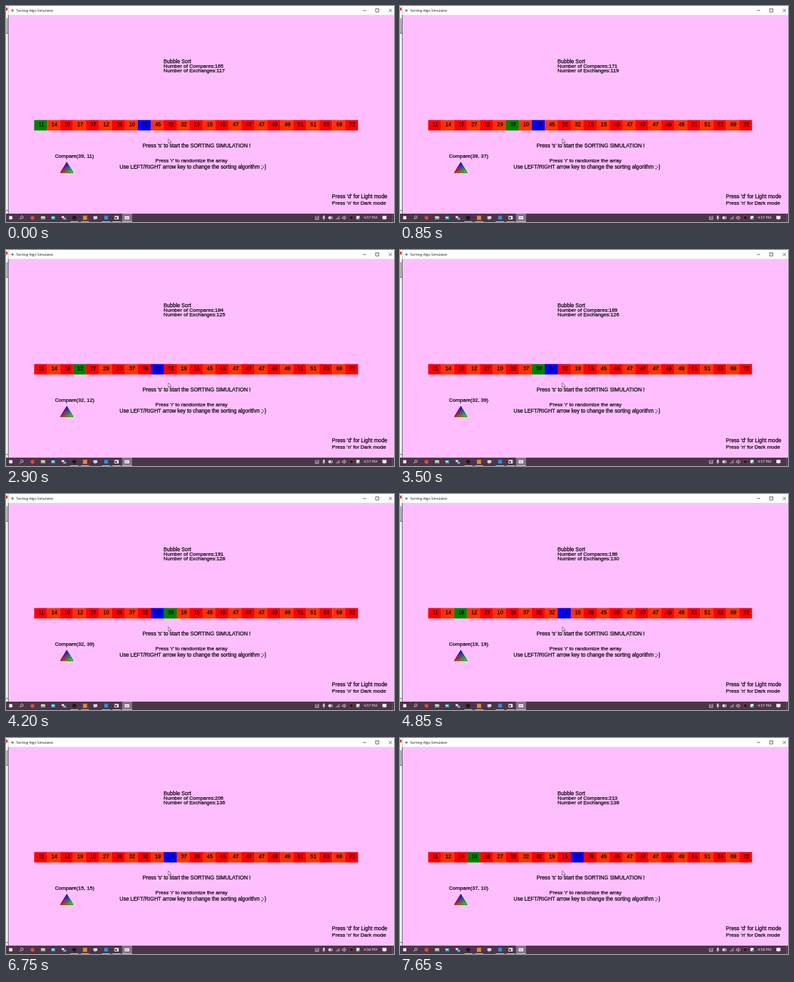
An HTML page for the animation above (7.7 s loop, 600 by 336 pixels).

```html
<!DOCTYPE html>
<html lang="en">
<head>
<meta charset="utf-8">
<title>Sorting Algo Simulator</title>
<style>
  html, body { margin: 0; width: 100%; height: 100%; overflow: hidden; background: #ffbfff; }
  svg { display: block; width: 600px; height: 336px; }
  text { font-family: "Liberation Sans", Arial, sans-serif; white-space: pre; }
  .app { font-size: 8.2px; fill: #080008; stroke: #080008; stroke-width: .25px; }
  .tight { font-size: 8.07px; }
  .ui { font-family: "Open Sans", "Noto Sans", sans-serif; font-size: 5.6px; }
  .mix { isolation: isolate; }
  .mix polygon { mix-blend-mode: screen; }
  .line { fill: none; stroke: #e9e4e9; stroke-width: .8; }
</style>
</head>
<body>
<svg viewBox="0 0 600 336">
  <defs>
    <linearGradient id="top" gradientUnits="userSpaceOnUse" x1="94" y1="243" x2="94" y2="259.3">
      <stop stop-color="#00f"/><stop offset="1" stop-color="#000"/>
    </linearGradient>
    <linearGradient id="left" gradientUnits="userSpaceOnUse" x1="83.9" y1="259.3" x2="99" y2="250">
      <stop stop-color="#f00"/><stop offset="1" stop-color="#000"/>
    </linearGradient>
    <linearGradient id="right" gradientUnits="userSpaceOnUse" x1="104.1" y1="259.3" x2="89" y2="250">
      <stop stop-color="#0f0"/><stop offset="1" stop-color="#000"/>
    </linearGradient>
  </defs>

  <rect width="600" height="336" fill="#ffbfff"/>

  <!-- window behind -->
  <rect width="4" height="323" fill="#f4f1f5"/>
  <rect y="19" width="3" height="23" fill="#b5b0b8"/>
  <path d="M3.5 13V323" stroke="#6b616d" stroke-width="1"/>
  <path d="M0 42.5H3M0 318H3" stroke="#666" stroke-width="1"/>

  <!-- title bar -->
  <rect width="600" height="13.8" fill="#fff"/>
  <rect y="2.5" width="2.5" height="4.5" fill="#d5402c"/>
  <path d="M3.5 0V13" stroke="#aaa" stroke-width=".6"/>
  <circle cx="10" cy="7" r="1.8" fill="#5f7f90"/>
  <text class="ui" x="16" y="8.9" style="font-size:5.5px" fill="#111">Sorting Algo Simulator</text>
  <g fill="none" stroke="#222" stroke-width=".7">
    <path d="M552 7H557M592 4.5L597 9.5M597 4.5L592 9.5"/>
    <rect x="571.8" y="4.6" width="4.6" height="4.6"/>
  </g>

  <!-- messages -->
  <g class="app">
    <text x="243.6" y="89.3">Bubble Sort</text>
    <text class="tight" id="compares" x="243.6" y="95.6"></text>
    <text class="tight" id="swaps" x="243.6" y="102.5"></text>
    <text x="211.3" y="219.9">Press 's' to start the SORTING SIMULATION !</text>
    <text class="tight" x="231" y="243.2">Press 'r' to randomize the array</text>
    <text x="175.5" y="253.1">Use LEFT/RIGHT arrow key to change the sorting algorithm ;-)</text>
    <text class="tight" id="pair" x="75.7" y="236.2"></text>
    <text x="504" y="298.8">Press 'd' for Light mode</text>
    <text class="tight" x="504" y="308.8">Press 'n' for Dark mode</text>
  </g>
  <g class="mix">
    <polygon points="94,243 83.9,259.3 104.1,259.3" fill="#000" style="mix-blend-mode:normal"/>
    <polygon points="94,243 83.9,259.3 104.1,259.3" fill="url(#top)"/>
    <polygon points="94,243 83.9,259.3 104.1,259.3" fill="url(#left)"/>
    <polygon points="94,243 83.9,259.3 104.1,259.3" fill="url(#right)"/>
  </g>

  <g id="cells" class="app"></g>

  <path d="M251 206.8V213.6L252.6 212.2L253.7 214.6L254.8 214.1L253.8 211.8H255.8Z" fill="#fff" stroke="#111" stroke-width=".6"/>

  <!-- taskbar -->
  <rect y="323" width="600" height="13" fill="#4b3549"/>
  <rect x="179.5" y="323" width="15.5" height="13" fill="#85758a"/>
  <rect x="4.8" y="326.8" width="5" height="5" fill="#f4f0f4"/>
  <circle class="line" cx="24.6" cy="328.6" r="2"/>
  <path class="line" d="M23 330.2L21 332.2"/>
  <circle cx="41" cy="329.4" r="3" fill="#dd4b39"/>
  <rect x="54" y="327" width="6.5" height="5" fill="#f3cf62"/>
  <rect x="54" y="330" width="6.5" height="2" fill="#5aa9dd"/>
  <rect x="70" y="327" width="6" height="5" fill="#37a9b8"/>
  <rect x="71" y="328" width="3" height="2" fill="#d7edf0"/>
  <rect x="86" y="326.8" width="4" height="3" fill="#d8dfe1"/>
  <rect x="88.5" y="329.4" width="4.5" height="3" fill="#6fb0d8"/>
  <circle cx="105.5" cy="329.3" r="3.1" fill="#1b191c"/>
  <rect x="119" y="326.3" width="6.4" height="6.4" fill="#e8862e"/>
  <rect x="135.2" y="327" width="6" height="4.3" fill="#dcd6dd"/>
  <path d="M137 331.3V333L139 331.3" fill="#dcd6dd"/>
  <rect x="152" y="326.5" width="5.6" height="5.6" fill="#2499e0"/>
  <rect x="167.8" y="326.6" width="6.4" height="5.4" fill="#f1f3f4"/>
  <rect x="168.8" y="328.4" width="2.8" height="2.4" fill="#15191c"/>
  <rect x="183.5" y="327" width="7" height="4.8" fill="#f3f1f4"/>
  <rect x="184.8" y="329" width="3.8" height="1" fill="#8b8091"/>
  <path d="M99.5 335.5H112M116 335.5H128.5M148 335.5H161M164.5 335.5H177.5M179.5 335.5H195" stroke="#d9bfdb" stroke-width="1"/>

  <g class="line">
    <path d="M478.5 327V332H483.5V326.5M481 326.5V331.5"/>
    <path d="M489.3 329.5Q491.5 333.5 493.7 329.5M491.5 332V333.2"/>
    <path d="M499 327.8H504.5V331H499Z"/>
    <path d="M511 332V330.5M513 332V328.7M515 332V327"/>
    <path d="M520 328.3H521.5L523.3 326.5V332.2L521.5 330.5H520ZM525 327.5Q526.5 329.4 525 331.2"/>
  </g>
  <rect x="490.4" y="326" width="2.2" height="4.6" rx="1.1" fill="#f4f0f4"/>
  <rect x="499" y="327.8" width="3.5" height="3.2" fill="#e9e4e9"/>
  <circle cx="534" cy="329.3" r="3" fill="#231a20" stroke="#c93a35" stroke-width=".8"/>
  <rect x="541.8" y="326.6" width="5" height="5" fill="#f0f2ef"/>
  <circle cx="546" cy="330.8" r="1.6" fill="#44a55a"/>
  <path d="M582 326.6H588.4V331.4H586L584.6 333V331.4H582Z" fill="#f4f0f4"/>
  <path d="M597.5 323V336" stroke="#83708a" stroke-width=".6"/>
  <text id="clock" class="ui" x="553" y="331.3" fill="#fff"></text>
</svg>
<script>
const LOOP = 7700, LEAD = 30;
const KEEP = 40, BEFORE = 215, AFTER = 97.5;   // ms per comparison without / around an exchange
const CELL = 20.03, LEFT = 43.6;
const NS = 'http://www.w3.org/2000/svg';
const $ = id => document.getElementById(id);

function bubbleSort(list, pass, compares, swaps) {
  const steps = [];
  let at = -LEAD;
  const show = (j, ms) => {
    steps.push({ at, list: [...list], pass, j, compares, swaps });
    at += ms;
  };
  for (; at < LOOP; pass++) {
    for (let j = 0; j < list.length - 1 - pass; j++) {
      compares++;
      if (list[j] <= list[j + 1]) { show(j, KEEP); continue; }
      show(j, BEFORE);
      [list[j], list[j + 1]] = [list[j + 1], list[j]];
      swaps++;
      show(j, AFTER);
    }
  }
  return steps;
}

const start = [11, 14, 19, 27, 37, 12, 29, 10, 39, 45, 32, 32, 19, 15, 45,
               47, 47, 47, 49, 49, 51, 51, 63, 69, 72];
const steps = bubbleSort([...start], 8, 164, 117);

function add(name, attrs) {
  const el = document.createElementNS(NS, name);
  for (const key in attrs) el.setAttribute(key, attrs[key]);
  return $('cells').appendChild(el);
}

const cells = start.map((_, i) => {
  const x = LEFT + i * CELL;
  return {
    box: add('rect', { x, y: 177.4, width: CELL + .05, height: 16.2, stroke: 'none' }),
    label: add('text', { x: x + 6.6, y: 187.4 })
  };
});

function colour(i, step) {
  if (i === step.pass) return '#0000ff';
  if (i === step.j) return '#008000';
  return i % 2 ? '#ff3300' : '#ff0000';
}

let shown;
function frame(now) {
  const t = now % LOOP;
  const step = steps.findLast(s => s.at <= t);
  if (step !== shown) {
    shown = step;
    cells.forEach(({ box, label }, i) => {
      box.setAttribute('fill', colour(i, step));
      label.textContent = step.list[i];
    });
    $('compares').textContent = 'Number of Compares:' + step.compares;
    $('swaps').textContent = 'Number of Exchanges:' + step.swaps;
    $('pair').textContent = `Compare(${step.list[step.pass]}, ${step.list[step.j]})`;
  }
  $('clock').textContent = t < 6100 ? '4:57 PM' : '4:58 PM';
}

const begin = performance.now();
function tick() {
  frame(performance.now() - begin);
  requestAnimationFrame(tick);
}
tick();
</script>
</body>
</html>
```
